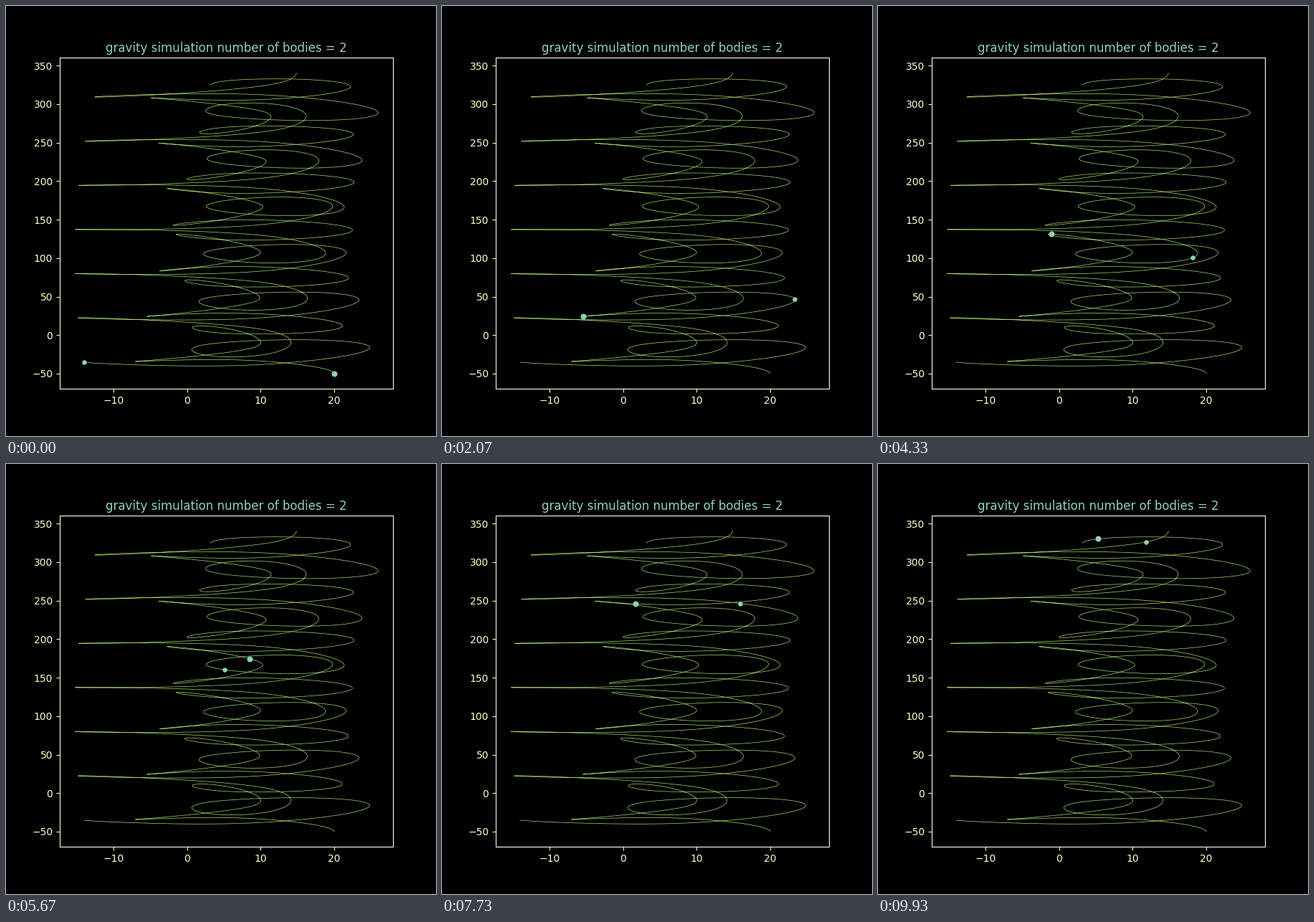
A matplotlib script that plays this animation: 600 by 600 pixels, repeating every 9990 ms.

```python
import math

import matplotlib.pyplot as plt
import numpy as np
from matplotlib.animation import FuncAnimation

FRAMES = 150
LOOP_MS = 9990

# Time is counted in frames; positions are complex numbers x + iy.
STEP = 0.005
START = -0.535            # last apoapsis before the first frame
END = 150.05
PULL = 168.81             # attraction is PULL / distance
APO_RADIUS = 37.71
APO_ANGLE = math.radians(152.24)
APO_SPEED = 4.8102
HEAVY_SHARE = 10 / 17

CENTRE = complex(6.0, -43.82)
DRIFT = complex(0.01336, 2.499)

TRAIL = "#a6dc69"
ACCENT = "#8dd3b4"
PALE = "#ffffc4"


def polar(radius, angle):
    return radius * complex(math.cos(angle), math.sin(angle))


def accel(d):
    return -PULL * d / abs(d) ** 2


def orbit():
    """Separation of the two bodies, integrated with RK4."""
    d = polar(APO_RADIUS, APO_ANGLE)
    v = polar(APO_SPEED, APO_ANGLE + math.pi / 2)
    path = [d]
    h = STEP
    for _ in range(round((END - START) / h)):
        a1 = accel(d)
        v2 = v + a1 * h / 2
        a2 = accel(d + v * h / 2)
        v3 = v + a2 * h / 2
        a3 = accel(d + v2 * h / 2)
        v4 = v + a3 * h
        a4 = accel(d + v3 * h)
        d += (v + 2 * v2 + 2 * v3 + v4) * h / 6
        v += (a1 + 2 * a2 + 2 * a3 + a4) * h / 6
        path.append(d)
    return np.array(path[round(-START / h):])


gap = orbit()
centre = CENTRE + DRIFT * STEP * np.arange(len(gap))
heavy = centre - (1 - HEAVY_SHARE) * gap
light = centre + HEAVY_SHARE * gap

plt.rcParams["font.family"] = "DejaVu Sans"
fig = plt.figure(figsize=(6, 6), dpi=100, facecolor="black")
ax = fig.add_subplot(facecolor="black")
ax.set_xlim(-17.3, 28.0)
ax.set_ylim(-69.55, 360.4)
ax.set_xticks(range(-10, 21, 10))
ax.set_yticks(range(-50, 351, 50))
ax.tick_params(color=PALE, labelcolor=PALE)
for spine in ax.spines.values():
    spine.set_color("#ffffe4")
ax.set_title("gravity simulation number of bodies = 2", color=ACCENT)

dots = []
for path, size in ((heavy, 5.8), (light, 4.7)):
    ax.plot(path.real, path.imag, color=TRAIL, lw=0.5)
    dot, = ax.plot([], [], "o", color=ACCENT, ms=size, mew=0, zorder=5)
    dots.append((dot, path))


def update(frame):
    i = round(frame / STEP)
    for dot, path in dots:
        dot.set_data([path[i].real], [path[i].imag])
    return [dot for dot, _ in dots]


update(0)
anim = FuncAnimation(fig, update, frames=FRAMES, interval=LOOP_MS / FRAMES,
                     repeat=True, repeat_delay=0)
plt.show()
```
